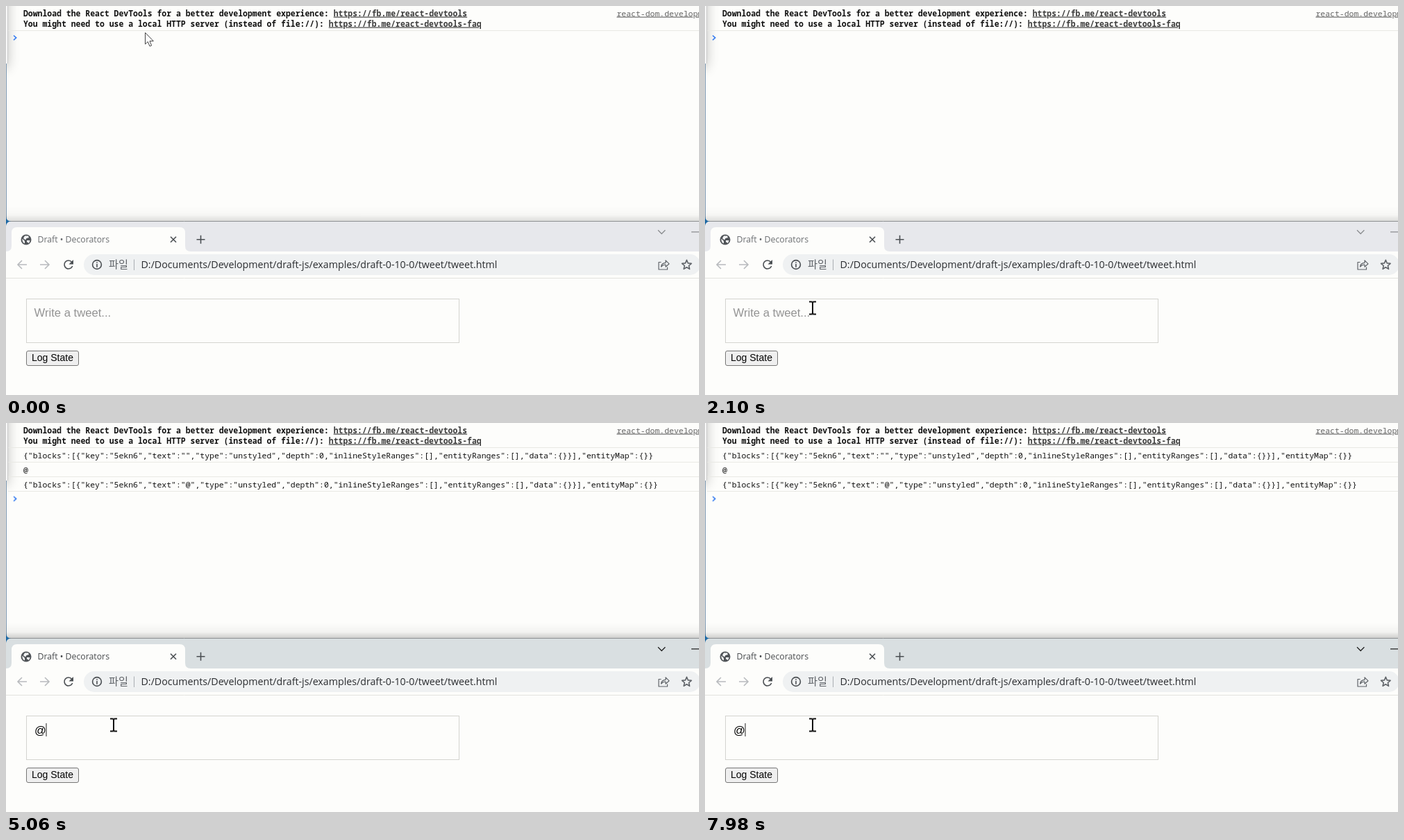
These frames come from a looping animation (998x561 px, 8000 ms). An HTML page:

```html
<!DOCTYPE html>
<html lang="en">
<head>
<meta charset="utf-8">
<title>Draft editor demo</title>
<style>
html, body { margin: 0; width: 100%; height: 100%; overflow: hidden; background: #fdfdfb; }
svg { display: block; width: 100%; height: 100%; }
text { white-space: pre; }
.mono { font: 11.46px "Noto Sans Mono", monospace; fill: #111; }
.bold { font-weight: 700; }
.link { fill: #3c3c3c; text-decoration: underline; }
.source { fill: #666; }
.ui { font-family: "Open Sans", "Noto Sans", sans-serif; }
.page { font-family: "Liberation Sans", Arial, sans-serif; }
.line { fill: none; stroke: #4b4f53; stroke-width: 1.6; }
.thin { stroke: #5f6368; stroke-width: 1.2; }
.pale { stroke: #b9bbbe; }
.rule { stroke: #e9e9e4; }

/* One shared 8 s clock; state changes are hard cuts. */
.cut { animation: 8s step-end infinite; }
.strip { animation-name: strip; }
.controls { animation-name: controls; }
.title { animation-name: title; }
.shade { animation-name: shade; }
.hint { animation-name: hint; }
.prompt { animation-name: prompt; }
.focused { animation-name: focused; }
.typed { animation-name: typed; }
.caret-empty { animation-name: caret-empty; }
.caret-typed { animation-name: caret-typed; }
.arrow { animation-name: arrow; }
.ibeam { animation-name: ibeam; }
.pointer { animation: travel 8s infinite; }

@keyframes strip { 0% { fill: #e7e8ec } 32.5%, 100% { fill: #d9dfe1 } }
@keyframes controls { 0% { stroke: #8b8d90 } 32.5%, 100% { stroke: #222 } }
@keyframes title { 0% { fill: #6c6f72 } 32.5%, 100% { fill: #484b4e } }
@keyframes shade { 0% { opacity: .7 } 32.5%, 100% { opacity: 1 } }
@keyframes hint { 0% { fill: #949494; opacity: 1 } 33.75% { fill: #b9b9b9; opacity: 1 } 61%, 100% { opacity: 0 } }
@keyframes prompt {
  0% { transform: translateY(0) }
  33.75% { transform: translateY(21px) }
  61%, 100% { transform: translateY(63.5px) }
}
@keyframes focused { 0% { opacity: 0 } 33.75%, 100% { opacity: 1 } }
@keyframes typed { 0% { opacity: 0 } 61%, 100% { opacity: 1 } }
@keyframes caret-empty { 0% { opacity: 0 } 33.75% { opacity: 1 } 50%, 100% { opacity: 0 } }
@keyframes caret-typed { 0% { opacity: 0 } 61% { opacity: 1 } 79.1% { opacity: 0 } 96%, 100% { opacity: 1 } }
@keyframes arrow { 0% { opacity: 1 } 18.2%, 100% { opacity: 0 } }
@keyframes ibeam { 0% { opacity: 0 } 18.2%, 100% { opacity: 1 } }
@keyframes travel {
  0%, 1% { transform: translate(200px, 38px); animation-timing-function: ease-in-out }
  15.6%, 17.2% { transform: translate(158px, 413px); animation-timing-function: ease-out }
  21%, 100% { transform: translate(155px, 435.5px) }
}
</style>
</head>
<body>
<svg viewBox="0 0 998 561" preserveAspectRatio="none">
  <defs>
    <linearGradient id="fade" x2="0" y2="1">
      <stop offset="0" stop-opacity="0"/>
      <stop offset=".6" stop-opacity=".04"/>
      <stop offset="1" stop-opacity=".18"/>
    </linearGradient>
    <filter id="blur" x="-100%" y="-50%" width="300%" height="200%"><feGaussianBlur stdDeviation="9"/></filter>
  </defs>
  <rect width="998" height="561" fill="#fdfdfb"/>

  <!-- console -->
  <g>
    <rect x="-30" y="-40" width="32" height="129" opacity=".26" filter="url(#blur)"/>
    <rect width="2" height="83" fill="#f7f7f7"/>
    <path d="M2.5 0V83" stroke="#c9c9c9"/>
    <path d="M.5 83V310" stroke="#7f9ab3"/>
    <text class="mono bold" x="25" y="14.5">Download the React DevTools for a better development experience: <tspan class="link">https://fb.me/react-devtools</tspan></text>
    <text class="mono bold" x="25" y="29.5">You might need to use a local HTTP server (instead of file://): <tspan class="link">https://fb.me/react-devtools-faq</tspan></text>
    <text class="mono link source" x="879.5" y="14.5">react-dom.development.js</text>
    <path class="rule" d="M3 35.5H998"/>
    <g class="cut focused">
      <text class="mono" x="25" y="51">{"blocks":[{"key":"5ekn6","text":"","type":"unstyled","depth":0,"inlineStyleRanges":[],"entityRanges":[],"data":{}}],"entityMap":{}}</text>
      <path class="rule" d="M3 56.5H998"/>
    </g>
    <g class="cut typed">
      <text class="mono" x="25" y="72">@</text>
      <text class="mono" x="25" y="93">{"blocks":[{"key":"5ekn6","text":"@","type":"unstyled","depth":0,"inlineStyleRanges":[],"entityRanges":[],"data":{}}],"entityMap":{}}</text>
      <path class="rule" d="M3 77.5H998M3 98.5H998"/>
    </g>
    <path class="cut prompt" d="M11 42.5L14.7 45.8L11 49.1" fill="none" stroke="#367cf1" stroke-width="1.6"/>
  </g>

  <!-- browser frame -->
  <rect class="cut shade" y="288" width="998" height="22" fill="url(#fade)"/>
  <rect class="cut strip" y="310" width="998" height="44" fill="#e7e8ec"/>
  <path d="M0 310.5H998" stroke="#8d9092"/>
  <path d="M0 304Q1 310 7 310.5Q1 311 0 317Z" fill="#1f6aa5"/>
  <path d="M0 354Q8 354 8 346V327Q8 319 16 319H250Q258 319 258 327V346Q258 354 266 354H998V392H0Z" fill="#fdfdfb"/>
  <path d="M0 392.5H998" stroke="#e3e3df"/>

  <!-- tab -->
  <circle cx="29" cy="337" r="7.5" fill="#505458"/>
  <path d="M23.5 335.5L27 339V342.5Q23 341 23.5 335.5ZM27 331.5H32L33 334L29.5 335L28 337.5L25 335ZM30 338H34.5Q34 341 32.5 342L30 340Z" fill="#f4f5f6"/>
  <text class="ui cut title" x="45.5" y="341" font-size="12.3">Draft • Decorators</text>
  <path class="line" d="M237 332.8L245 340.8M245 332.8L237 340.8"/>
  <path class="line" d="M274.5 336.7H286.5M280.5 330.7V342.7"/>
  <path class="cut controls" d="M939 323.3L944.2 328.5L949.4 323.3M987 325.8H998" fill="none" stroke-width="1.3"/>

  <!-- toolbar -->
  <rect x="112" y="358" width="888" height="30" rx="15" fill="#eff1f2"/>
  <path class="line pale" d="M30 373H17M23 367L17 373L23 379M49 373H62M56 367L62 373L56 379"/>
  <path class="line" d="M94.7 369.2A6 6 0 1 0 95.7 375"/>
  <path d="M97 366V372.5H90.5Z" fill="#4b4f53"/>
  <circle class="line" cx="131" cy="373" r="6.4"/>
  <path class="line" d="M131 372V376.8M131 369.2V370.8"/>
  <text x="148" y="378" font-size="15.2" fill="#5f6368" font-family="'Noto Sans CJK KR', 'Noto Sans CJK', sans-serif">파일</text>
  <path d="M184.5 365.5V381" stroke="#aaaeb2"/>
  <text class="ui" x="194.5" y="378" font-size="14.22" fill="#2b2d30">D:/Documents/Development/draft-js/examples/draft-0-10-0/tweet/tweet.html</text>
  <g class="line thin" stroke-linejoin="round">
    <path d="M943.5 369.5H940V380H952.5V376.5M943.5 376Q944 370.5 950 370.3V366.8L955 371.8L950 376.2V373Q946 373 943.5 376Z"/>
    <path d="M980.3 366.3L982.2 370.9L987.1 371.3L983.4 374.5L984.5 379.4L980.3 376.8L976.1 379.4L977.2 374.5L973.5 371.3L978.4 370.9Z" stroke-width="1.6"/>
  </g>

  <!-- page -->
  <g class="page">
    <rect x="29.5" y="422.5" width="623" height="63" fill="none" stroke="#d4d4d0"/>
    <text class="cut hint" x="40.5" y="448" font-size="16.65">Write a tweet...</text>
    <text class="cut typed" x="41" y="448.5" font-size="16.65">@</text>
    <path class="cut caret-empty" d="M40.5 433V452" stroke="#222"/>
    <path class="cut caret-typed" d="M58 433V452" stroke="#222"/>
    <rect x="29.5" y="497.5" width="75" height="21" rx="2.5" fill="#efefef" stroke="#767676"/>
    <text x="37" y="512.3" font-size="14">Log State</text>
  </g>

  <!-- pointer -->
  <g class="pointer">
    <path class="cut arrow" d="M.5 .5V17L4.3 13.5L7 20L9.6 19L7 12.6H12.3Z" fill="#fff" stroke="#444"/>
    <path class="cut ibeam" d="M-5 -9H-2Q0 -9 0 -7Q0 -9 2 -9H5M0 -7V7M-5 9H-2Q0 9 0 7Q0 9 2 9H5" fill="none" stroke="#111" stroke-width="2"/>
  </g>
</svg>
</body>
</html>
```
